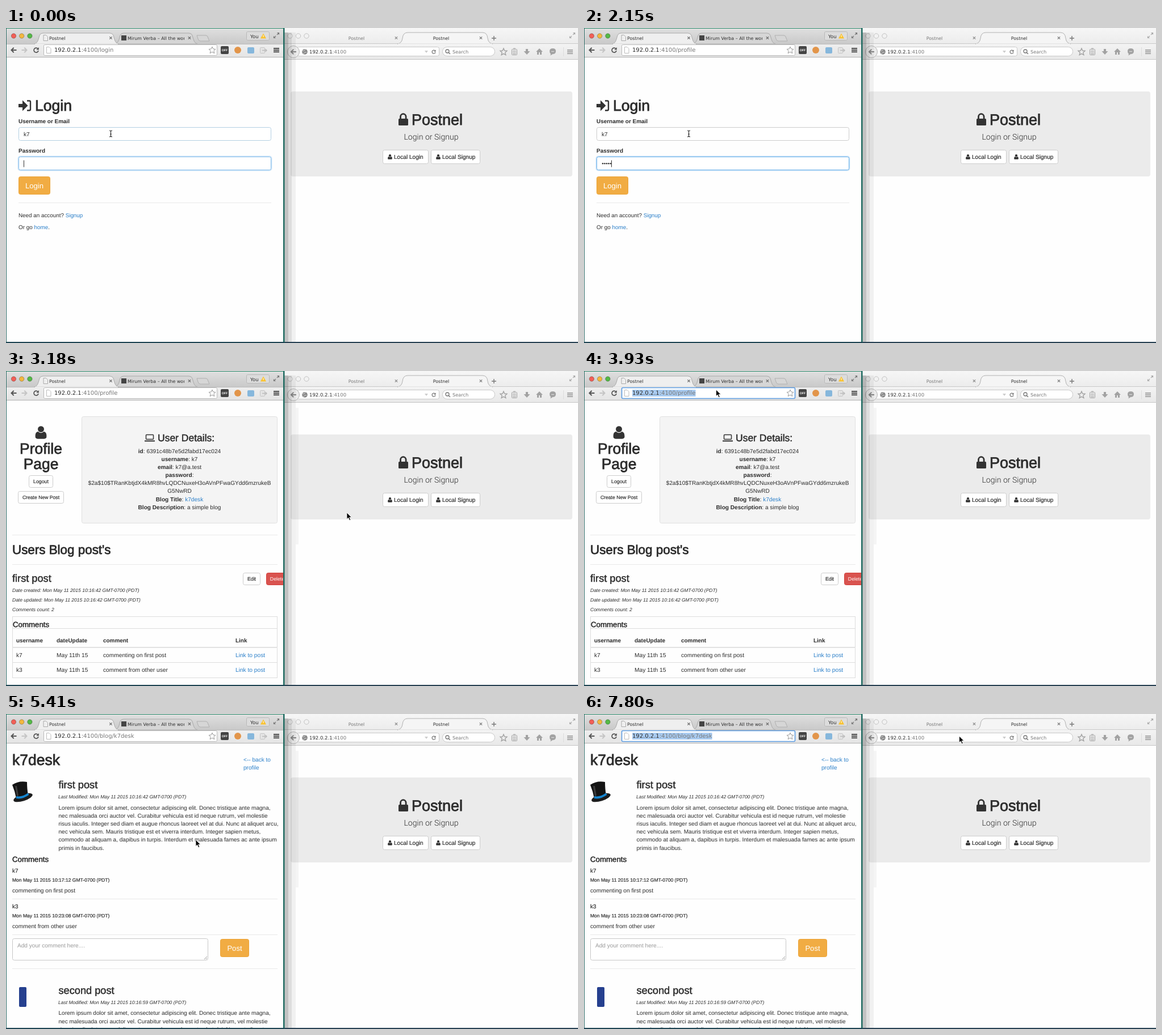
Write an HTML page that moves like this. It is 1007x556 px and loops after 8000 ms.

```html
<!DOCTYPE html>
<html lang="en">
<head>
<meta charset="utf-8">
<title>Login demo</title>
<style>
html, body { margin: 0; width: 100%; height: 100%; overflow: hidden; background: #fefefe }
svg { display: block; width: 1007px; height: 556px }
text { font-family: "Liberation Sans", Arial, sans-serif; fill: #2c2c2c; text-rendering: geometricPrecision; white-space: pre }
.ui { font-family: "DejaVu Sans", sans-serif }
.h { stroke: #2c2c2c; stroke-width: .8px }
.m { stroke: #2c2c2c; stroke-width: .5px }
.s { stroke: #2c2c2c; stroke-width: .2px }
.c { text-anchor: middle }
.b { font-weight: bold }
.i { font-style: italic }
.link { fill: #2a7fc9 }
.w { fill: #fff }
.dim { fill: #777 }
</style>
</head>
<body>
<svg id="stage" viewBox="0 0 1007 556"></svg>
<script>
const HOST = '192.0.2.1', PORT = ':4100', USER = 'k7', OTHER = 'k3', BLOG = 'k7desk', SITE = 'Postnel';
const BODY = 10.1, ICON = '#a2a2a2', ORANGE = '#f1ac43';

const text = (x, y, size, str, cls = '') => `<text x="${x}" y="${y}" font-size="${size}" class="${cls}">${str}</text>`;
const rect = (x, y, w, h, fill, more = '') => `<rect x="${x}" y="${y}" width="${w}" height="${h}" fill="${fill}" ${more}/>`;
const box = (x, y, w, h, fill, stroke, r = 3, more = '') => rect(x + .5, y + .5, w - 1, h - 1, fill, `rx="${r}" stroke="${stroke}" ${more}`);
const circle = (x, y, r, fill, more = '') => `<circle cx="${x}" cy="${y}" r="${r}" fill="${fill}" ${more}/>`;
const shape = (d, fill = '#333', more = '') => `<path d="${d}" fill="${fill}" ${more}/>`;
const line = (d, stroke, w = 1, more = '') => `<path d="${d}" fill="none" stroke="${stroke}" stroke-width="${w}" ${more}/>`;
const rule = (y, x1 = 11, x2 = 478, color = '#e9e9e9') => rect(x1, y, x2 - x1, 1, color);
const group = (id, body) => `<g id="${id}">${body}</g>`;
const at = (x, y, body, scale = 1) => `<g transform="translate(${x} ${y}) scale(${scale})">${body}</g>`;
const bold = s => `<tspan font-weight="bold">${s}</tspan>`;
const link = (s, more = '') => `<tspan class="link" ${more}>${s}</tspan>`;
const gradient = (id, from, to) => `<linearGradient id="${id}" x2="0" y2="1"><stop stop-color="${from}"/><stop offset="1" stop-color="${to}"/></linearGradient>`;
const cross = (x, y, c) => line(`M${x - 2.2} ${y - 2.2}l4.4 4.4m0-4.4l-4.4 4.4`, c, 1.2);
const bars = (x, y, c) => [-4, -.9, 2.2].map(d => rect(x - 5, y + d, 10, 1.9, c)).join('');
const star = (x, y, c, w = 1) => line(`M${x} ${y - 6}l1.8 4 4.2.4-3.2 2.9 1 4.3-3.8-2.3-3.8 2.3 1-4.3-3.2-2.9 4.2-.4z`, c, w);
const reload = (x, y, c, s = 1) => at(x, y, line('M3 -2.6A4 4 0 1 0 4 1', c, 1.7) + shape('M4.8-5v4.5H.3z', c), s);
const expand = (x, y, c) => line(`M${x + 1} ${y - 1}l3.5-3.5m-3 0h3v3M${x - 1} ${y + 1}l-3.5 3.5m3 0h-3v-3`, c, 1.2);
const arrow = (x, y, c, dir = 1) => at(x, y, `<g transform="scale(${dir} 1)">${line('M5 0h-9m4.2-4.2L-4 0l4.2 4.2', c, 2)}</g>`);
const person = (x, y, s = 1) => at(x, y, circle(0, -6, 5.6, '#333') + shape('M-10 9Q-11-1-5-1.5Q0 3 5-1.5Q11-1 10 9Q9 11.5 6 11.5H-6Q-9 11.5-10 9z'), s);
const button = (x, y, w, h, label, size, fill = '#fff', stroke = '#ccc') =>
  box(x, y, w, h, fill, stroke) + text(x + w / 2, y + h / 2 + size * .35, size, label, fill === '#fff' ? 'c s' : 'c w');

function rightWindow() {
  const localButton = (x, w, label) => box(x, 215, w, 25, '#fff', '#ccc') + person(x + 13, 227.5, .38) + text(x + 20, 231, BODY, label, 's');
  return rect(490, 0, 517, 556, '#fefefe') + rect(490, 0, 517, 28, 'url(#paleStrip)') + rect(490, 28, 517, 28, 'url(#paleBar)')
    + rule(27, 490, 1007, '#c9c9c9') + rule(55, 490, 1007, '#c6c6c6')
    + [500, 514.5, 529].map(x => circle(x, 14, 4.2, '#f2f2f2', 'stroke="#c2c2c2"')).join('')
    + shape('M689 28Q697 27 698 18Q699 8 707 8H839Q847 8 848 18Q849 27 857 28z', '#f5f5f5', 'stroke="#b2b2b2"') + rect(690, 27.5, 166, 2, '#f3f3f3')
    + text(617, 21, 7.9, SITE, 'ui c dim') + text(766, 21, 7.9, SITE, 'ui c') + cross(687, 17.5, '#888') + cross(836, 17.5, '#777')
    + line('M855 18h8m-4-4v8', '#777', 1.4) + expand(997, 13, '#aaa')
    + box(512, 33, 251, 17, '#fff', '#c8c8c8') + circle(506, 42, 10.5, '#ececec', 'stroke="#b5b5b5"') + arrow(506, 42, '#888')
    + circle(526, 42, 4.8, '#888') + line('M522 40q3 2 5-2m-3 8q0-4 5-3', '#ddd')
    + text(534, 45.3, 8.5, `${HOST}<tspan class="dim">${PORT}</tspan>`, 'ui')
    + shape('M737 40h6l-3 4z', '#ccc') + reload(753, 42, '#777', .75)
    + box(768, 33, 93, 17, '#fff', '#c8c8c8', 8) + circle(777, 41, 3, 'none', 'stroke="#777" stroke-width="1.3"') + line('M779 43l3 3', '#777', 1.5)
    + text(786, 45.2, 8.2, 'Search', 'ui dim') + star(876, 42, ICON, 1.4)
    + box(890, 37, 10, 11, 'none', ICON, 1) + line('M892 40.5h6m-6 2.5h6m-6 2.5h6M893 36h4', ICON)
    + shape('M915 37h4v4h3.5l-5.5 6-5.5-6h3.5z', ICON)
    + shape('M933 42l6-6 6 6h-2v5h-3v-4h-2v4h-3v-5z', ICON)
    + shape('M957 41q0-5 5.5-5t5.5 5-5.5 5l-4 2.5.5-3q-2-1.5-2-4.5z', ICON) + rule(41, 960, 965, '#ddd')
    + rect(981, 34, 1, 16, '#ddd') + bars(993, 42, ICON)
    + rect(501, 112, 496, 150, '#ebebeb', 'rx="4"')
    + rect(691, 160, 17, 12, '#333', 'rx="1.5"') + line('M694.5 161v-4.5a4.8 4.8 0 0 1 9.6 0v4.5', '#333', 2.8)
    + text(714, 171, 27, SITE, 'h')
    + `<text x="748.5" y="197.3" font-size="14.1" class="c" style="font-family:Roboto,sans-serif;font-weight:300">Login or Signup</text>`
    + localButton(663, 81, 'Local Login') + localButton(748, 87, 'Local Signup')
    + rect(490, 554, 517, 2, '#274052');
}

function leftChrome() {
  const tab = (x, w, fill) => shape(`M${x} 28q5-1 7-8l2-7q1.5-4 6-4H${x + w - 15}q4.5 0 6 4l2 7q2 7 7 8z`, fill, 'stroke="#aaa"');
  return rect(0, 0, 490, 28, 'url(#strip)') + rect(0, 0, 490, 1, '#2b8a6b')
    + tab(192, 145, '#d6d6d6') + rect(0, 28, 490, 24, 'url(#bar)') + rule(28, 0, 490, '#bcbcbc') + tab(50, 148, '#efefef') + rect(51, 27.5, 146, 2, '#efefef')
    + ['#f25f57', '#f3b73e', '#55b948'].map((c, i) => circle(13.5 + 14.2 * i, 14, 4.2, c, 'stroke="#0004"')).join('')
    + line('M66 12.5h4.5l3 3v7H66z', '#aaa') + text(76, 20.5, 7.9, SITE, 'ui') + cross(184.5, 17.5, '#666')
    + rect(203, 13, 9, 9, '#444')
    + `<g clip-path="url(#tabClip)">${text(214, 20.5, 7.9, 'Mirum Verba – All the word', 'ui')}</g>` + cross(323, 17.5, '#666')
    + shape('M336 13h16q3 0 4 5l2 5h-16q-3 0-4-4z', '#d6d6d6', 'stroke="#b0b0b0"')
    + box(423, 6, 41, 16, '#dcdcdc', '#b8b8b8', 2) + text(430, 17.5, 8.5, 'You', 'ui') + shape('M453 9.5l5 9h-10z', '#f9c22e') + rect(452.5, 12.5, 1, 3.5, '#fff')
    + expand(476, 13, '#777')
    + arrow(13.5, 39, '#555') + arrow(32.5, 39, '#c4c4c4', -1) + reload(53, 39, '#555')
    + `<rect id="omni" x="66.5" y="29.5" width="305" height="19" rx="2" fill="#fff"/>`
    + line('M71.5 33.5h4.5l3 3v8h-7.5z', '#bbb') + `<rect id="urlMark" x="85" y="33" height="12" fill="#a9cbf0"/>`
    + `<text x="85" y="42.3" font-size="10" class="ui" id="url">${HOST}<tspan fill="#777" id="path"></tspan></text>`
    + star(363, 39, '#999')
    + rect(378, 32, 14, 14, '#444', 'rx="2"') + text(385, 41.3, 5.3, 'OFF', 'b c w')
    + circle(408, 39, 6, '#e2954a') + rect(425, 34, 12, 11, '#86b7dc', 'rx="2"')
    + box(447, 34, 9, 11, '#e4e4e4', '#c4c4c4', 1) + line('M451 39.5h8m-2.5-2.5l2.5 2.5-2.5 2.5', '#bbb', 1.3)
    + bars(476, 39, '#444') + rule(51, 0, 490, '#b0b0b0');
}

function loginPage() {
  return shape('M22 134h7v-6.5l9.5 9.5-9.5 9.5v-6.5h-7z') + line('M37 128.5h4q2 0 2 2v13q0 2-2 2h-4', '#333', 2.4)
    + text(51, 146, 26.6, 'Login', 'h') + text(22, 167.7, 9.95, 'Username or Email', 'b') + text(22, 220.3, 9.95, 'Password', 'b')
    + `<rect id="userBox" x="22.5" y="175.5" width="444" height="23" rx="3" fill="#fff"/>` + text(31, 190.5, BODY, USER)
    + box(21, 226, 447, 26, 'none', '#66afe955', 4, 'stroke-width="2"')
    + `<rect id="passBox" x="22.5" y="227.5" width="444" height="23" rx="3" fill="#fff"/>`
    + `<g id="dots"></g><rect id="caret" y="233.5" width="1" height="12" fill="#333"/>`
    + button(22, 262, 56, 32, 'Login', 13.1, ORANGE, '#eca438') + rule(308, 22, 467)
    + text(22, 333.5, 9.85, `Need an account? ${link('Signup')}`) + text(22, 355, 9.9, `Or go ${link('home')}.`);
}

function profilePage() {
  const details = [`${bold('id')}: 6391c48b7e5d2fabd17ec024`, `${bold('username')}: ${USER}`, `${bold('email')}: ${USER}@a.test`, `${bold('password')}:`,
    '$2a$10$TRanKbtjdX4kMR8hvLQDCNuxeH3oAVnPFwaGYdd6mzrukeB', 'G5NwRD',
    `${bold('Blog Title')}: ${link(BLOG, 'id="blogLink"')}`, `${bold('Blog Description')}: a simple blog`];
  const row = (y, cells, cls) => [18, 89, 171, 404].map((x, i) => text(x, y, cls ? 9.95 : 10.2, cells[i], cls)).join('');
  const stamp = 'Mon May 11 2015 10:16:42 GMT-0700 (PDT)';
  return person(61.5, 108.5, .98) + text(61.5, 145.5, 26.4, 'Profile', 'h c') + text(61.5, 173, 26.4, 'Page', 'h c')
    + button(40, 184, 43, 22, 'Logout', 8.8) + button(21, 212, 81, 22, 'Create New Post', 8.65)
    + box(133, 80, 345, 189, '#f4f4f4', '#e0e0e0')
    + box(246, 112, 14, 9, 'none', '#333', 1, 'stroke-width="1.5"') + rect(244, 122.5, 18, 2, '#333') + text(267, 124, 17.5, 'User Details:', 'm')
    + details.map((s, i) => text(305.5, 144.6 + i * 14.17, BODY, s, 'c')).join('')
    + rule(289) + text(11, 323, 22.4, "Users Blog post's", 'h') + rule(341)
    + text(11, 372.3, 18.2, 'first post', 'm') + button(417, 356, 31, 22, 'Edit', 8.8) + button(458, 356, 39, 22, 'Delete', 8.8, '#d9534f', '#d43f3a')
    + [`Date created: ${stamp}`, `Date updated: ${stamp}`, 'Comments count: 2'].map((s, i) => text(11, 389.6 + i * 17, 8.5, s, 'i')).join('')
    + box(11, 433, 467, 109, 'none', '#ddd', 0) + text(12, 452, 13.25, 'Comments', 'm') + rule(454, 11, 478, '#ddd')
    + row(478.5, ['username', 'dateUpdate', 'comment', 'Link'], 'b') + rule(487, 11, 478, '#ddd') + rule(488, 11, 478, '#e8e8e8')
    + row(505, [USER, 'May 11th 15', 'commenting on first post', link('Link to post')]) + rule(514, 11, 478, '#ddd')
    + row(531.2, [OTHER, 'May 11th 15', 'comment from other user', link('Link to post')]);
}

function blogPage() {
  const lines = ['Lorem ipsum dolor sit amet, consectetur adipiscing elit. Donec tristique ante magna,',
    'nec malesuada orci auctor vel. Curabitur vehicula est id neque rutrum, vel molestie',
    'risus iaculis. Integer sed diam et augue rhoncus laoreet vel at dui. Nunc at aliquet arcu,',
    'nec vehicula sem. Mauris tristique est et viverra interdum. Integer sapien metus,',
    'commodo at aliquam a, dapibus in turpis. Interdum et malesuada fames ac ante ipsum', 'primis in faucibus.'];
  const post = (y, title, time) => text(92.5, y, 18.2, title, 'm')
    + text(92, y + 17.8, 8.5, `Last Modified: Mon May 11 2015 ${time} GMT-0700 (PDT)`, 'i')
    + lines.map((s, i) => text(92.5, y + 37.6 + i * 14.17, 10.05, s)).join('');
  const comment = (y, who, time, body) => text(11, y, 9.9, who, 's')
    + text(11, y + 16.6, 8.55, `Mon May 11 2015 ${time} GMT-0700 (PDT)`, 's') + text(11, y + 35.7, 10.2, body) + rule(y + 46.5);
  const hat = `<ellipse cx="30" cy="147.5" rx="17.5" ry="6" fill="#1d1d1d" transform="rotate(-18 30 147.5)"/>`
    + shape('M11 125Q23 117 37 120Q37 133 39 143Q30 150 18 149Q16 137 11 125z', '#141414')
    + line('M18 147Q29 149 39.5 141', '#1686d0', 4) + shape('M16 127l3 0 3 17-3 1z', '#3c3c3c');
  return text(11, 90, 26.5, BLOG, 'h') + text(418, 83.7, BODY, '&lt;-- back to', 'link') + text(418, 97.8, BODY, 'profile', 'link')
    + hat + post(131.2, 'first post', '10:16:42') + text(11, 261, 13.25, 'Comments', 'm')
    + comment(279.5, USER, '10:17:12', 'commenting on first post') + comment(342.6, OTHER, '10:23:08', 'comment from other user')
    + box(11, 396, 345, 39, '#fff', '#c8c8c8') + text(20, 412, BODY, '<tspan fill="#999">Add your comment here....</tspan>') + line('M349 433l5-5m-2 5l2-2', '#999')
    + button(377, 397, 51, 32, 'Post', 13.1, ORANGE, '#eca438') + rule(449)
    + rect(23, 482, 13, 35, '#26408f', 'rx="2"') + post(493.8, 'second post', '10:16:59');
}

const cursors = {
  arrow: shape('M0 0V11.5L2.7 9l2 4.6 2-.9-2-4.4h3.6z', '#000', 'stroke="#fff" stroke-width=".8"'),
  beam: line('M-2.5-5.5Q0-5.5 0-4V4Q0 5.5-2.5 5.5M2.5-5.5Q0-5.5 0-4V4Q0 5.5 2.5 5.5M-1.3.8h2.6', '#222', 1.1),
  hand: shape('M-2.5-6.5q1.3-1 2 .5l1 4 1.2-.4 1.8.6 1.6.8q1 .6.6 2.2L5 5v2H-.5L-4.8 1.5q-.3-1.5 1.3-1l1.3 1z', '#fff', 'stroke="#222" stroke-width="1"')
};

const stage = document.getElementById('stage');
stage.innerHTML = `<defs>${gradient('strip', '#e0e0e0', '#c9c9c9')}${gradient('bar', '#efefef', '#e4e4e4')}
  ${gradient('paleStrip', '#f6f6f6', '#ececec')}${gradient('paleBar', '#f3f3f3', '#e8e8e8')}
  <clipPath id="tabClip"><rect x="213" y="10" width="101" height="16"/></clipPath>
  <clipPath id="page"><rect x="1" y="52" width="487" height="502"/></clipPath></defs>`
  + rightWindow()
  + [[497, .13], [503, .08], [510, .05]].map(([x, a]) => rect(490, 8, x - 490, 546, '#000', `opacity="${a}"`)).join('')
  + group('wideShadow', rect(510, 65, 5, 241, '#000', 'opacity=".035"'))
  + rect(0, 0, 490, 556, '#fefefe') + leftChrome()
  + `<g clip-path="url(#page)">` + group('login', loginPage()) + group('profile', profilePage()) + group('blog', blogPage())
  + group('status', box(0, 542, 164, 14, '#dedede', '#b5b5b5', 2) + text(4, 551.2, 7.7, `${HOST}${PORT}/blog/${BLOG}`, 'ui')) + '</g>'
  + rect(0, 0, 1, 556, '#2f6d68') + rect(488, 0, 2.5, 556, '#1f6a60') + rect(0, 554, 490, 2, '#1d4352')
  + group('pointer', Object.entries(cursors).map(([k, v]) => group(k, v)).join(''));

const $ = id => document.getElementById(id);
const show = (id, on) => $(id).style.display = on ? '' : 'none';

const moves = [
  [0, 184.5, 186.5, 'beam'], [2600, 160, 200, 'arrow'], [2750, 250, 250, 'arrow'], [2900, 500, 290, 'arrow'], [3050, 600, 250, 'arrow'],
  [3200, 708, 140, 'arrow'], [3330, 560, 60, 'arrow'], [3480, 350, 20, 'arrow'], [3630, 232.5, 33, 'arrow'],
  [4080, 231, 55, 'arrow'], [4230, 240, 90, 'arrow'], [4380, 262, 135, 'arrow'], [4530, 290, 180, 'arrow'], [4680, 320, 212, 'arrow'],
  [4820, 335, 230, 'hand'], [4970, 338.5, 235, 'hand'], [5410, 334, 222, 'arrow'], [5560, 305, 160, 'arrow'], [5710, 260, 90, 'arrow'],
  [5850, 226, 44, 'beam'], [6000, 221, 39, 'beam'], [7050, 260, 36, 'beam'], [7200, 400, 20, 'arrow'], [7350, 560, 10, 'arrow'],
  [7500, 680, 28, 'arrow'], [7650, 699, 38, 'arrow'], [7800, 660.5, 39, 'arrow']
];
const keystrokes = [360, 660, 1100, 1300, 1850];

function render(t) {
  const page = t < 2300 ? 'login' : t < 5410 ? 'profile' : 'blog';
  for (const p of ['login', 'profile', 'blog']) show(p, p === page);
  $('path').textContent = PORT + (t < 2150 ? '/login' : page === 'blog' ? `/blog/${BLOG}` : '/profile');

  const selected = t >= 3930 && t < 4080 || t >= 6000;
  show('urlMark', selected);
  $('urlMark').setAttribute('width', $('url').getComputedTextLength());
  $('omni').setAttribute('stroke', selected ? '#5c9be0' : '#b9b9b9');
  $('omni').setAttribute('stroke-width', selected ? 1.6 : 1);

  const typed = keystrokes.filter(k => t >= k).length;
  $('dots').innerHTML = Array.from({ length: typed }, (_, i) => circle(33 + i * 3.4, 239.3, 1.25, '#333')).join('');
  $('caret').setAttribute('x', 31 + typed * 3.4);
  $('userBox').setAttribute('stroke', t < 150 ? '#b3cfe2' : '#ccc');
  $('passBox').setAttribute('stroke', t < 150 ? '#86bdea' : '#66afe9');

  const hover = t >= 4820 && t < 5410;
  show('status', hover);
  $('blogLink').setAttribute('text-decoration', hover ? 'underline' : 'none');
  show('wideShadow', t >= 2900);

  const [, x, y, kind] = moves.findLast(m => t >= m[0]);
  $('pointer').setAttribute('transform', `translate(${x} ${y})`);
  for (const k in cursors) show(k, k === kind);
}

const start = performance.now();
function tick() {
  render((performance.now() - start) % 8000);
  requestAnimationFrame(tick);
}
tick();
</script>
</body>
</html>
```
